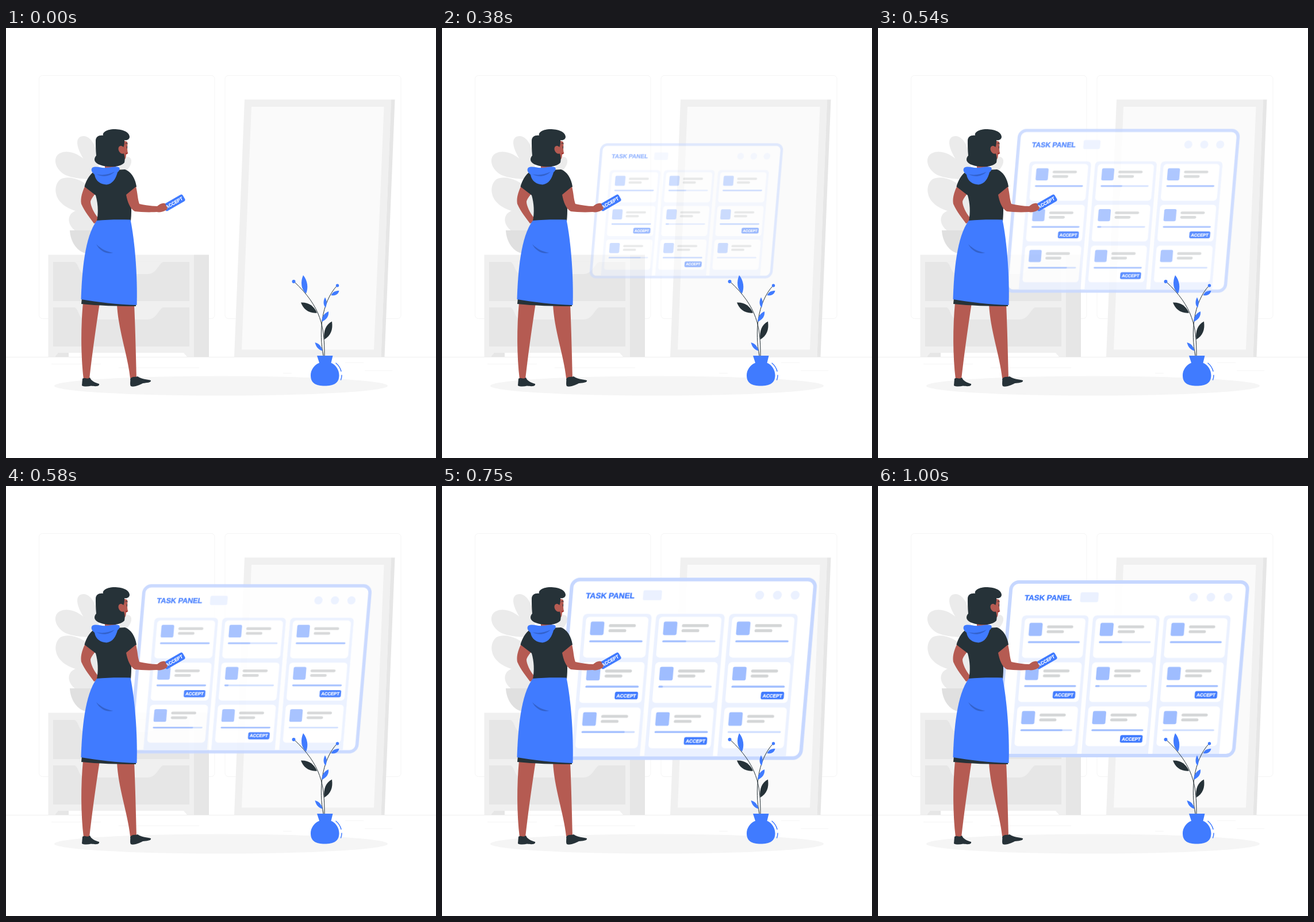
Recreate the animation shown at these times as an HTML page without scripts. Size 748x748 px, loop 1.04 s.

```html
<!DOCTYPE html>
<html lang="en">
<head>
<meta charset="utf-8">
<title>Task panel</title>
<style>
html, body { margin: 0; width: 100%; height: 100%; overflow: hidden; background: #fff; }
svg { display: block; width: 100%; height: 100%; }
text { font-family: "Liberation Sans", Arial, sans-serif; font-weight: 700; }
.blue { fill: #407bff; }
.dark { fill: #263238; }
.skin { fill: #b55b52; }
.fold { fill: #3362cc; }
.label { fill: #fff; stroke: #fff; stroke-width: .25; font-size: 8px; text-anchor: middle; }
.title { fill: #407bff; stroke: #407bff; stroke-width: .45; font-size: 13.2px; }
.done { fill: #9fbdff; }

/* The panel pops in with a slight overshoot, then rests. */
.show { animation: show 1040ms step-end infinite; }
.zoom { transform-origin: 424.7px 318px; animation: zoom 1040ms infinite; }
@keyframes show {
  0% { visibility: hidden; }
  16.3%, 100% { visibility: visible; }
}
@keyframes zoom {
  0% { opacity: 0; transform: scale(.5); animation-timing-function: cubic-bezier(.36, -.01, .5, 1.38); }
  92.8%, 100% { opacity: 1; transform: scale(1); }
}
</style>
</head>
<body>
<svg viewBox="0 0 748 748">
  <defs>
    <path id="column" fill="#ebf1ff" d="M0 241V8Q0 0 8 0H108Q116 0 116 8V241Z"/>
    <g id="card">
      <rect x="5.5" width="105.5" height="69" rx="6" fill="#fff"/>
      <rect class="done" x="14" y="8" width="23" height="23" rx="3"/>
      <g fill="#d4d6d7">
        <rect x="45" y="12.5" width="45.5" height="5" rx="2.5"/>
        <rect x="45" y="21" width="30" height="5" rx="2.5"/>
      </g>
      <rect x="14" y="40" width="90" height="3" rx="1.5" fill="#cfdeff"/>
    </g>
    <g id="full">
      <use href="#card"/>
      <rect class="done" x="14" y="40" width="90" height="3" rx="1.5"/>
    </g>
    <g id="button">
      <rect class="blue" x="-19.5" y="-6.5" width="39" height="13" rx="3"/>
      <text class="label" y="2.8" transform="skewX(-4)">ACCEPT</text>
    </g>
    <g id="ready">
      <use href="#full"/>
      <use href="#button" x="84.5" y="56.5"/>
    </g>
    <g id="drawer">
      <path fill="#e6e6e6" d="M82 407H319V475H82Z"/>
      <path fill="#f0f0f0" d="M118 406.5C128 409 125 428 139 428H246C262 428 265 410 274 406.5Z"/>
    </g>
  </defs>

  <!-- room -->
  <g fill="none" stroke="#f5f5f5">
    <rect x="57.5" y="82.5" width="305.5" height="423" rx="6"/>
    <rect x="381" y="82.5" width="306" height="423" rx="6"/>
    <path stroke="#efefef" d="M0 572.5H748"/>
    <path d="M79 584.5H165M196 591H336M482 600.5H497M590 582H622M624 596H672"/>
  </g>

  <!-- mirror -->
  <path fill="#f0f0f0" d="M415 124.5H670L652.5 572H397Z"/>
  <path fill="#e6e6e6" d="M670 124.5H676.5L658.5 572H652.5Z"/>
  <path fill="#fafafa" d="M427 137H657.5L640 559.5H410Z"/>

  <!-- grey plant -->
  <g fill="#ebebeb">
    <path d="M160 255C140 240 124 214 124 199C124 187 138 184 147 194C156 203 162 225 162 250Z"/>
    <path d="M160 262C140 264 118 262 104 256C90 249 83 235 87 225C92 213 112 212 127 222C144 232 155 246 160 262Z"/>
    <path d="M163 320C140 326 108 318 95 303C83 290 84 271 95 263C108 256 135 262 150 283Z"/>
    <path d="M163 356H128C116 353 107 340 110 329C113 318 128 314 142 318Z"/>
    <path d="M150 250H185V340H150Z"/>
    <path d="M190 262C205 255 219 242 218 230C216 221 206 223 200 232Z"/>
  </g>
  <path fill="#e0e0e0" d="M111 352H200V392H140C124 390 112 372 111 352Z"/>

  <!-- dresser -->
  <path fill="#e6e6e6" d="M327 394.5H353V572H327ZM90 565H109V572H85Z"/>
  <path fill="#f0f0f0" d="M73.5 394.5H327V572H315L309 565H91L85 572H73.5Z"/>
  <use href="#drawer"/>
  <use href="#drawer" y="79"/>

  <ellipse cx="374" cy="622.5" rx="290" ry="17" fill="#f5f5f5"/>

  <!-- panel -->
  <g class="show"><g class="zoom">
    <g transform="translate(229.5 164) skewX(-4.86)">
      <rect x="6" y="6" width="405.5" height="296" rx="10" fill="#fff" opacity=".9"/>
      <rect x="3" y="3" width="411.5" height="302" rx="13" fill="none" stroke="#c6d7ff" stroke-width="6"/>
      <text class="title" x="28" y="34.4" transform="translate(2.4) skewX(-4)">TASK PANEL</text>
      <g fill="#ebf1ff">
        <rect x="125" y="21" width="31.5" height="17" rx="3"/>
        <circle cx="322" cy="29.5" r="7.5"/>
        <circle cx="352" cy="29.5" r="7.5"/>
        <circle cx="382" cy="29.5" r="7.5"/>
      </g>
      <g transform="translate(26.5 61)">
        <use href="#column"/>
        <use href="#full" y="5"/>
        <use href="#ready" y="81.7"/>
        <use href="#card" y="158.4"/>
        <rect class="done" x="14" y="198.4" width="73" height="3" rx="1.5"/>
      </g>
      <g transform="translate(150 61)">
        <use href="#column"/>
        <use href="#card" y="5"/>
        <rect class="done" x="14" y="45" width="40.5" height="3" rx="1.5"/>
        <use href="#card" y="81.7"/>
        <rect class="done" x="14" y="121.7" width="7.5" height="3" rx="1.5"/>
        <use href="#ready" y="158.4"/>
      </g>
      <g transform="translate(273.5 61)">
        <use href="#column"/>
        <use href="#full" y="5"/>
        <use href="#ready" y="81.7"/>
        <use href="#card" y="158.4"/>
      </g>
    </g>
  </g></g>

  <!-- vase -->
  <g fill="none" stroke="#263238">
    <path d="M554 570C554 520 549 486 501 441"/>
    <path d="M552 570C544 530 548 478 576 448"/>
  </g>
  <g class="blue">
    <circle cx="500.5" cy="441" r="3"/>
    <circle cx="576.5" cy="448" r="2.7"/>
    <path d="M517 430C525 440 526 452 522 462C513 455 512 441 517 430Z"/>
    <path d="M555 468.500C559 475 558 481 556 486.500C551 481 552 474 555 468.500Z"/>
    <path d="M561 493C562 502 557 507 549.500 511C549 502 554 496 561 493Z"/>
    <path d="M579.500 457C578 464 572 466 565.500 465C568 459 573 457 579.500 457Z"/>
    <path d="M537.500 547C545 549 549 554 550.500 561.500C543 560 539 554 537.500 547Z"/>
    <path d="M541 570H568.500L565.500 582.500C574 586 579.500 595 579.500 604C579.500 618 570 622.500 554.500 622.500C539 622.500 530 618 530 604C530 595 536 586 545 582.500Z"/>
  </g>
  <g class="dark">
    <path d="M513 477.500C527 477 536 484 541 495.500C527 497 517 489 513 477.500Z"/>
    <path d="M567 510.500C569 525 565 535 553.500 542C552 527 556 516 567 510.500Z"/>
  </g>
  <path fill="none" stroke="#407bff" stroke-width="1.5" stroke-linecap="round" d="M574 583Q581 589 583 597M584 604Q584 608 582.500 612"/>

  <!-- woman -->
  <g class="skin">
    <path d="M138 274C133 284 129 296 131 306C137 320 146 330 153 340L160 338V330C153 322 147 309 147 302C148 297 152 293 156 287Z"/>
    <path d="M134 478H163C155 530 149 575 145 611H135C130 570 130 520 134 478Z"/>
    <path d="M193 480H223C225 525 226 570 227 609H216C212 570 195 525 193 480Z"/>
    <path d="M172 236H191V250H172Z"/>
    <path d="M203 195L211 198C212 205 210 211 212.300 218L209 219.500C209 225 208 230 202 231L196 220Z"/>
  </g>
  <g class="dark">
    <path d="M133 610C137 607 141 612 146 608C148 614 155 617 162 619C163 623 158 624 148 622.500C142 624 135 624 132 622Z"/>
    <path d="M216 610C221 605 225 608 229 606C236 611 245 611 252 613C253 617 245 617 238 618C230 622 222 625 217 623C215 619 217 614 216 610Z"/>
    <path d="M132 470L131 480C160 483 195 484 226 484V478Z"/>
    <path d="M154 249C145 255 139 266 136.500 276L156 291C160 305 161 320 158 336H217C219 318 218 303 215 290L227 276C225 262 218 250 207 246Z"/>
  </g>
  <path class="blue" d="M158 335C177 333 198 333 216.500 333.500C224 370 229 430 227.500 482C193 481 160 477 130.500 472C132 425 137 362 158 335Z"/>
  <path class="fold" d="M157 376C166 385 175 389 186.500 391C175 394 163 388 157 376Z"/>
  <path class="blue" d="M150 243C157 239 165 244 174 243C183 243 190 240 196 242C199 244 198 248 194 251C191 262 186 271 175 272.500C165 272 156 267 154 255C149 251 147 247 150 243Z"/>
  <path class="fold" d="M157 254C167 257 178 255 189 250C180 259 167 260 157 254Z"/>

  <path class="dark" d="M157 222C156 212 156 203 156 196C156 189 162 186 169 187C167 181 177 176 188 176C202 176 214 180 215 189C215 194 210 196 206 195C206 200 206 206 203 209L205 219C207 223 207 230 206 234C200 241 187 242 177 241C164 240 154 235 154 229C154 226 155 224 157 222Z"/>
  <path class="skin" d="M204 207C198 202 194 208 196 213C198 218 202 220 206 218Z"/>
  <g fill="none" stroke="#263238" stroke-linecap="round">
    <path d="M208 201Q210 199.500 211.500 201M210.500 206V209"/>
  </g>
  <path fill="#a02724" d="M208 217L212 218L209 220Z"/>

  <use href="#button" transform="translate(292.500 304) rotate(-30)"/>
  <path class="skin" d="M226 276C229 287 229 298 232 306C242 308 253 310 263 310C267 307 271 304 276 305C279 306 277 309 279 310C282 312 281 315 278 317C273 320 267 321 262 320C247 321 233 320 224 319C216 315 211 302 209 290Z"/>
</svg>
</body>
</html>
```
